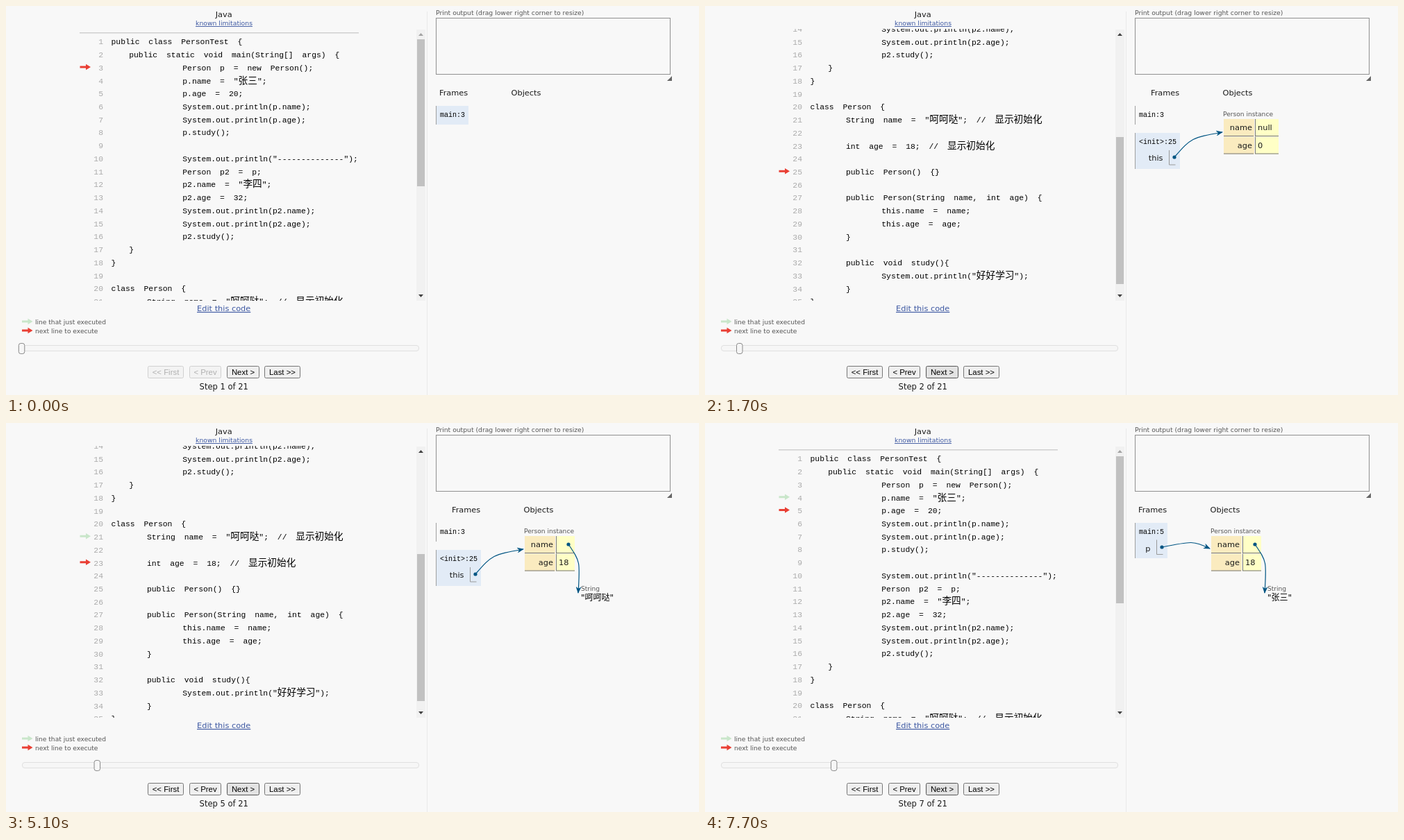
Animation of 998 by 561 pixels, one loop 8 s. Source, as an HTML page:

```html
<!DOCTYPE html>
<html lang="en">
<head>
<meta charset="utf-8">
<title>Java code visualizer</title>
<style>
html, body { margin: 0; width: 100%; height: 100%; overflow: hidden; background: #f8f8f8; }
svg { display: block; width: 998px; height: 561px; }
text { white-space: pre; fill: #1a1a1a; }
.ui { font-family: "DejaVu Sans", Verdana, sans-serif; font-size: 11.35px; }
.small { font-size: 9.1px; fill: #555; }
.mid { text-anchor: middle; }
.end { text-anchor: end; }
.link { fill: #3d58a2; text-decoration: underline; }
.code, .frame { font-family: "Liberation Mono", "Noto Sans CJK SC", monospace; }
.code { font-size: 11.38px; }
.code text { fill: #000; word-spacing: 6.02px; }
.code .end { fill: #aaa; }
.han { font: 13.66px "Noto Sans CJK SC", "Noto Sans CJK JP", sans-serif; }
.frame { font-size: 10px; fill: #000; }
.btn { font-family: "Liberation Sans", Arial, sans-serif; font-size: 11.4px; text-anchor: middle; }
.wire { fill: none; stroke: #005583; stroke-width: 1.2; }
.str { font: 12px "DejaVu Sans", "Noto Sans CJK SC", sans-serif; fill: #000; }
</style>
</head>
<body>
<svg viewBox="0 0 998 561">
  <defs>
    <clipPath id="pane"><rect x="18" y="33" width="572" height="392"/></clipPath>
    <marker id="tip" markerUnits="userSpaceOnUse" markerWidth="10" markerHeight="8" refX="9" refY="4" orient="auto">
      <path d="M0 0L10 4L0 8L3 4Z" fill="#005583"/>
    </marker>
    <path id="arrow" d="M0-1.5H8.5V-4.2L15.5 0L8.5 4.2V1.5H0Z"/>
  </defs>
  <rect width="998" height="561" fill="#f8f8f8"/>
  <path d="M606.5 8V561" stroke="#e9e9e9"/>

  <g class="ui">
    <text class="mid" x="313.7" y="16">Java</text>
    <text class="mid link" x="314" y="28" font-size="9.27">known limitations</text>
    <text class="mid link" x="313.7" y="440">Edit this code</text>
    <text class="small" x="42" y="458.5">line that just executed</text>
    <text class="small" x="42" y="472">next line to execute</text>
    <text class="mid" id="count" x="313.7" y="553" font-size="11.5"></text>
    <text class="small" x="619" y="13" style="font-size:9.22px">Print output (drag lower right corner to resize)</text>
  </g>
  <use href="#arrow" x="23" y="455" fill="#c9e6ca"/>
  <use href="#arrow" x="23" y="468" fill="#e93f34"/>

  <g clip-path="url(#pane)">
    <g id="scroll">
      <path d="M106 38.8H508" stroke="#bbb"/>
      <g id="code" class="code"></g>
      <use href="#arrow" id="done" x="106.5" fill="#c9e6ca"/>
      <use href="#arrow" id="next" x="106.5" fill="#e93f34"/>
    </g>
  </g>

  <rect x="591" y="34" width="13" height="391" fill="#f1f1f1"/>
  <rect id="thumb" x="592" width="11" height="212" fill="#c1c1c1"/>
  <path id="up" d="M594 43H601L597.5 39Z"/>
  <path d="M594 416H601L597.5 420Z" fill="#404040"/>

  <rect x="23.5" y="489.5" width="571" height="8" rx="3.5" fill="#f6f6f6" stroke="#e0e0e0"/>
  <rect id="knob" y="486.5" width="8.5" height="15" rx="3" fill="#f6f6f6" stroke="#888"/>
  <g id="buttons"></g>

  <rect x="619.5" y="17.5" width="337" height="81" fill="#f8f8f8" stroke="#909090"/>
  <path d="M959 101V108H952Z" fill="#666"/>
  <path d="M954 106L957 103" stroke="#ccc" stroke-width=".7"/>
  <g id="heap"></g>
</svg>
<script>
const $ = id => document.getElementById(id);
const LOOP = 8000, TICK = 100, PITCH = 18.737, INDENT = 12.85;

// Each line starts with its indent, counted in wide blanks.
const source = `0public class PersonTest {
2public static void main(String[] args) {
8Person p = new Person();
8p.name = "张三";
8p.age = 20;
8System.out.println(p.name);
8System.out.println(p.age);
8p.study();

8System.out.println("--------------");
8Person p2 = p;
8p2.name = "李四";
8p2.age = 32;
8System.out.println(p2.name);
8System.out.println(p2.age);
8p2.study();
2}
0}

0class Person {
4String name = "呵呵哒"; // 显示初始化

4int age = 18; // 显示初始化

4public Person() {}

4public Person(String name, int age) {
8this.name = name;
8this.age = age;
4}

4public void study(){
8System.out.println("好好学习");
4}
0}`.split("\n");

const steps = [
  { at: 0, main: 3 },
  { at: 1100, main: 3, init: 25, age: 0 },
  { at: 3100, main: 3, init: 21, age: 0 },
  { at: 4000, main: 3, init: 23, age: 0, name: "呵呵哒" },
  { at: 5100, main: 3, init: 25, age: 18, name: "呵呵哒" },
  { at: 6000, main: 4, age: 18, name: "呵呵哒" },
  { at: 7300, main: 5, age: 18, name: "张三" }
];

// [start, line]; a third value makes the arrow jump.
const RETURN = 25.29;
const nextKeys = [[0, 3], [1492, 25], [3210, 21], [4187, 23], [5190, RETURN], [6290, 4], [7490, 5]];
const doneKeys = [[0, -9], [3210, 25, 1], [4187, 21], [5190, 23], [6290, RETURN], [7490, 4, 1]];

const clamp = x => Math.max(0, Math.min(1, x));
const swing = x => 0.5 - Math.cos(Math.PI * clamp(x)) / 2;
const cubic = x => (x = clamp(x)) < 0.5 ? 4 * x ** 3 : 1 - 4 * (1 - x) ** 3;
const lineY = n => 50.5 + (n - 1) * PITCH;

function lineAt(keys, t) {
  let i = keys.length - 1;
  while (i && keys[i][0] > t) i--;
  const [start, line, jump] = keys[i];
  if (!i || jump) return line;
  const from = keys[i - 1][1];
  return from + (line - from) * cubic((t - start) / 200);
}

const scrollAt = t => 262 * (swing((t - 1188) / 290) - swing((t - 6041) / 300));

const text = (x, y, s, cls = "ui") => `<text x="${x}" y="${y}" class="${cls}">${s}</text>`;
const box = (x, y, w, h, fill) => `<rect x="${x}" y="${y}" width="${w}" height="${h}" fill="${fill}"/>`;
const line = (d, color = "#777") => `<path d="${d}" fill="none" stroke="${color}"/>`;

// Pointers bow up from the chord; the bend leans away from its slope.
function wire(x, y, toX, toY) {
  const bend = `${(x + toX) / 2 + (toY < y ? -10 : 10)} ${(y + toY) / 2 - 10}`;
  return `<path class="wire" d="M${x} ${y}C${bend} ${bend} ${toX} ${toY}" marker-end="url(#tip)"/>` +
    `<circle cx="${x}" cy="${y}" r="2.6" fill="#005583"/>`;
}

function stackFrame(y, w, h, label, active) {
  return (active ? box(619, y, w, h, "#e2ebf6") : "") +
    line(`M619.5 ${y}v${h}`, "#a0a0a0") + text(625, y + 15.5, label, "frame");
}

const slot = (x, y) => line(`M${x} ${y}v21h9`, "#999");

function drawObject(x, s) {
  const w = s.name ? 27 : 34, v = x + 46;
  let out = text(x, 158.5, "Person instance", "ui small");
  ["name", "age"].forEach((field, i) => {
    const y = 163 + i * 25.5, edge = y + 24.5;
    out += box(x + 1, y, 44, 25, "#faebbf") + box(v, y, w, 25, "#ffffc6") +
      line(`M${x + 1} ${edge}h43M${v + 1} ${edge}h${w - 1}`) + line(`M${v + .5} ${y}v25`) +
      text(x + 42, y + 16.3, field, "ui end");
  });
  out += text(v + 4, 205, s.age);
  if (!s.name) return out + text(v + 4, 179.3, "null");
  return out + wire(x + 64, 175, x + 78, 245) +
    text(x + 82, 242, "String", "ui small") + text(x + 82, 256, `"${s.name}"`, "str");
}

function drawHeap(s) {
  const shift = s.init ? 18 : 0, hasP = !s.init && s.name;
  let out = text(624 + shift, 129, "Frames") + text(727.5 + shift, 129, "Objects") +
    stackFrame(144, 47, hasP ? 51 : 27, "main:" + s.main, !s.init);
  if (s.age !== undefined) out += drawObject(728 + shift, s);
  if (s.init) out += stackFrame(183, 65, 52, "&lt;init&gt;:" + s.init, true) +
    text(659.5, 223, "this", "ui end") + slot(668.5, 208) + wire(676, 218, 745, 182);
  if (hasP) out += text(641.5, 185, "p", "ui end") + slot(650.5, 168.5) + wire(658, 179, 727, 181);
  return out;
}

function drawButton(x, w, label, state) {
  const [fill, edge, ink] = {
    normal: ["#efefef", "#767676", "#000"],
    hover: ["#e3e3e3", "#555", "#000"],
    press: ["#f5f5f5", "#8d8d8d", "#000"],
    off: ["#f3f3f3", "#d0d0d0", "#b0b0b0"]
  }[state];
  return `<rect x="${x + .5}" y="519.5" width="${w - 1}" height="17" rx="2" fill="${fill}" stroke="${edge}"/>` +
    `<text class="btn" x="${x + w / 2}" y="532" style="fill:${ink}">${label}</text>`;
}

function nextState(t) {
  if (t < 600) return "normal";
  return [3100, 5100, 7300].some(c => t >= c - 200 && t < c) ? "press" : "hover";
}

$("code").innerHTML = source.map((row, i) => {
  const y = 55.3 + i * PITCH;
  const words = row.slice(1).replace(/[\u4e00-\u9fff]+/g, '<tspan class="han">$&</tspan>');
  return text(140, y, i + 1, "end") + (row && text(151.5 + row[0] * INDENT, y, words, ""));
}).join("");

let shownStep, shownButtons;

function render(t) {
  const index = steps.filter(s => s.at <= t).length - 1;
  if (index !== shownStep) {
    shownStep = index;
    $("heap").innerHTML = drawHeap(steps[index]);
    $("count").textContent = `Step ${index + 1} of 21`;
    $("knob").setAttribute("x", 18.3 + index * 571 / 21);
  }

  const back = index ? "normal" : "off", state = nextState(t);
  if (back + state !== shownButtons) {
    shownButtons = back + state;
    $("buttons").innerHTML = drawButton(204, 52, "&lt;&lt; First", back) + drawButton(264, 46, "&lt; Prev", back) +
      drawButton(318, 47, "Next &gt;", state) + drawButton(372, 52, "Last &gt;&gt;", "normal");
  }

  const top = scrollAt(t);
  $("scroll").setAttribute("transform", `translate(0 ${-top})`);
  $("thumb").setAttribute("y", 48 + top * 0.538);
  $("up").setAttribute("fill", top > 0.3 ? "#404040" : "#a3a3a3");
  $("next").setAttribute("y", lineY(lineAt(nextKeys, t)));
  $("done").setAttribute("y", lineY(lineAt(doneKeys, t)));
}

// The screen is sampled ten times a second, so motion holds within each tick.
const begin = performance.now();
function tick() {
  const t = (performance.now() - begin) % LOOP;
  render(Math.floor(t / TICK) * TICK);
  requestAnimationFrame(tick);
}
tick();
</script>
</body>
</html>
```
